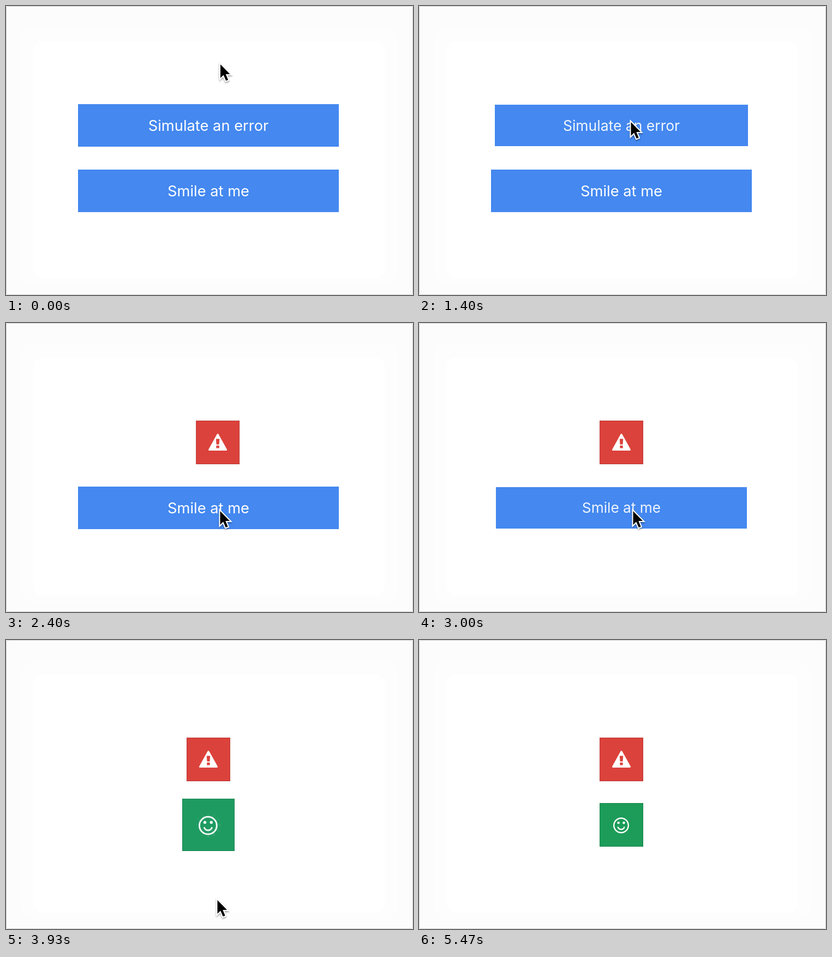
An HTML page that plays this animation: 746x530 px, repeating every 5540 ms.

```html
<!DOCTYPE html>
<html lang="en">
<head>
<meta charset="utf-8">
<title>Progress buttons</title>
<style>
  html, body { margin: 0; width: 100%; height: 100%; overflow: hidden; background: #fff; }
  svg { display: block; width: 746px; height: 530px; }
  text { font: 400 27.3px Inter, Roboto, sans-serif; fill: #fff; text-anchor: middle; }
</style>
</head>
<body>
<svg viewBox="0 0 746 530" xmlns="http://www.w3.org/2000/svg">
  <defs>
    <filter id="shadow" x="-50%" y="-50%" width="200%" height="200%">
      <feDropShadow dx="0" dy="2" stdDeviation="1.8" flood-color="#000" flood-opacity=".4"/>
    </filter>
  </defs>
  <rect x=".5" y=".5" width="745" height="529" rx="3" fill="#fcfcfc" stroke="#cbcbcb"/>
  <rect x="28" y="38" width="690" height="474" rx="24" fill="#fdfdfd"/>
  <rect x="50" y="64" width="645" height="436" rx="18" fill="#fff"/>
  <g id="buttons"></g>
  <g id="cursor" filter="url(#shadow)">
    <path d="M0 0V25L5.7 19.5 10.2 30 14.2 28.4 9.8 18H17.6Z" stroke="#fff" stroke-width="4" paint-order="stroke"/>
  </g>
</svg>
<script>
const LOOP = 5540, TICK = 200 / 3, CENTER = 371;
const BLUE = [68, 136, 240], RED = [220, 66, 60], GREEN = [28, 156, 88];

const mix = (a, b, u) => a + (b - a) * u;
const smooth = u => u * u * (3 - 2 * u);
const backOut = u => 1 + 2.7 * (u - 1) ** 3 + 1.7 * (u - 1) ** 2;
const progress = (t, start, length) => Math.max(0, Math.min(1, (t - start) / length));
const ease = (t, start, length) => smooth(progress(t, start, length));

function set(el, attrs) {
  for (const name in attrs) el.setAttribute(name, attrs[name]);
}

function add(parent, tag, attrs = {}) {
  const el = document.createElementNS('http://www.w3.org/2000/svg', tag);
  set(el, attrs);
  parent.append(el);
  return el;
}

function warningIcon(g, color) {
  add(g, 'path', { d: 'M0-14.5 15.5 13.5H-15.5Z', fill: '#fff', stroke: '#fff', 'stroke-width': 3, 'stroke-linejoin': 'round' });
  add(g, 'path', { d: 'M-3.2-6.5H3.2L2.5 3.7H-2.5ZM-2.7 5.7H2.7V10.5H-2.7Z', fill: color });
}

function smileIcon(g) {
  const line = { fill: 'none', stroke: '#fff', 'stroke-width': 2.4, 'stroke-linecap': 'round' };
  add(g, 'circle', { cx: -.5, cy: 1, r: 13.3, ...line });
  for (const x of [-5.4, 4.4]) add(g, 'circle', { cx: x, cy: -3.8, r: 2.3, fill: '#fff' });
  add(g, 'path', { d: 'M-6.3 4.4C-4.4 9.6 3.4 9.6 5.3 4.4', ...line });
}

// Damped sideways shake, one swing per tick.
const shake = age => -22 * (1 - progress(age, 0, 450)) * Math.sin(Math.PI * Math.max(0, age) / TICK);

// Swells by about half and settles again.
const pop = age => 1 + .48 * Math.sin(Math.PI * progress(age, 0, 270));

function makeButton({ label, y, color, icon, press, fold, release, done, move = () => 0, grow = () => 1 }) {
  const group = add(document.getElementById('buttons'), 'g');
  const box = add(group, 'rect');
  const edge = add(group, 'rect', { fill: 'none', stroke: '#000' });
  const content = add(group, 'g');
  const text = add(content, 'text', { y: 9.8 });
  text.textContent = label;
  const spokes = Array.from({ length: 12 }, (_, i) => add(content, 'line', {
    y1: -12, y2: -18, stroke: '#fff', 'stroke-width': 4, 'stroke-linecap': 'round', transform: `rotate(${i * 30})`
  }));
  const sign = add(content, 'g');
  icon(sign, `rgb(${color})`);

  return t => {
    const result = ease(t, done - 40, 90);
    const pressed = ease(t, press, 150) * (1 - backOut(progress(t, release, 150)));
    const scale = (1 - .05 * pressed) * grow(t - done);
    const size = mix(78, 80, result);
    const w = Math.round(scale * mix(478, size, ease(t, fold, 230)) / 2);
    const h = Math.round(scale * size / 2);

    set(group, { transform: `translate(${CENTER + move(t - done)} ${y})` });
    set(content, { transform: `scale(${scale})` });
    set(box, { x: -w, y: -h, width: 2 * w, height: 2 * h, fill: `rgb(${BLUE.map((c, i) => Math.round(mix(c, color[i], result)))})` });
    set(edge, { x: .5 - w, y: .5 - h, width: 2 * w - 1, height: 2 * h - 1, opacity: result * .15 });
    set(text, { opacity: (1 - .13 * progress(t, press, 150)) * (1 - ease(t, fold, 110)) });

    const spin = t - fold - 170;
    const lead = Math.floor(spin * 12 / 1000);
    const shown = progress(spin, 0, 90) * (1 - result);
    spokes.forEach((spoke, i) => {
      const age = (lead - i + 120) % 12;
      set(spoke, { opacity: shown * Math.max(.26, .9 - age * .085) });
    });
    set(sign, { opacity: result });
  };
}

const buttons = [
  makeButton({
    label: 'Simulate an error', y: 219, color: RED, icon: warningIcon,
    press: 1317, fold: 1500, release: 1775, done: 2300, move: shake
  }),
  makeButton({
    label: 'Smile at me', y: 339, color: GREEN, icon: smileIcon,
    press: 2899, fold: 3135, release: 3045, done: 3830, grow: pop
  })
];

// Each move glides to a new resting place.
const moves = [
  { start: 950, length: 400, x: 388.5, y: 213 },
  { start: 1500, length: 290, x: 392.5, y: 329 },
  { start: 1850, length: 350, x: 392.5, y: 345 },
  { start: 3067, length: 313, x: 387.5, y: 477 },
  { start: 4270, length: 530, x: 15, y: 545 }
];
const cursor = document.getElementById('cursor');

function draw(time) {
  const t = Math.floor(time / TICK + 1e-6) * TICK;
  buttons.forEach(update => update(t));
  let x = 393, y = 107;
  for (const m of moves) {
    const u = ease(t, m.start, m.length);
    x = mix(x, m.x, u);
    y = mix(y, m.y, u);
  }
  set(cursor, { transform: `translate(${x} ${y})` });
}

function loop() {
  draw(performance.now() % LOOP);
  requestAnimationFrame(loop);
}
loop();
</script>
</body>
</html>
```
